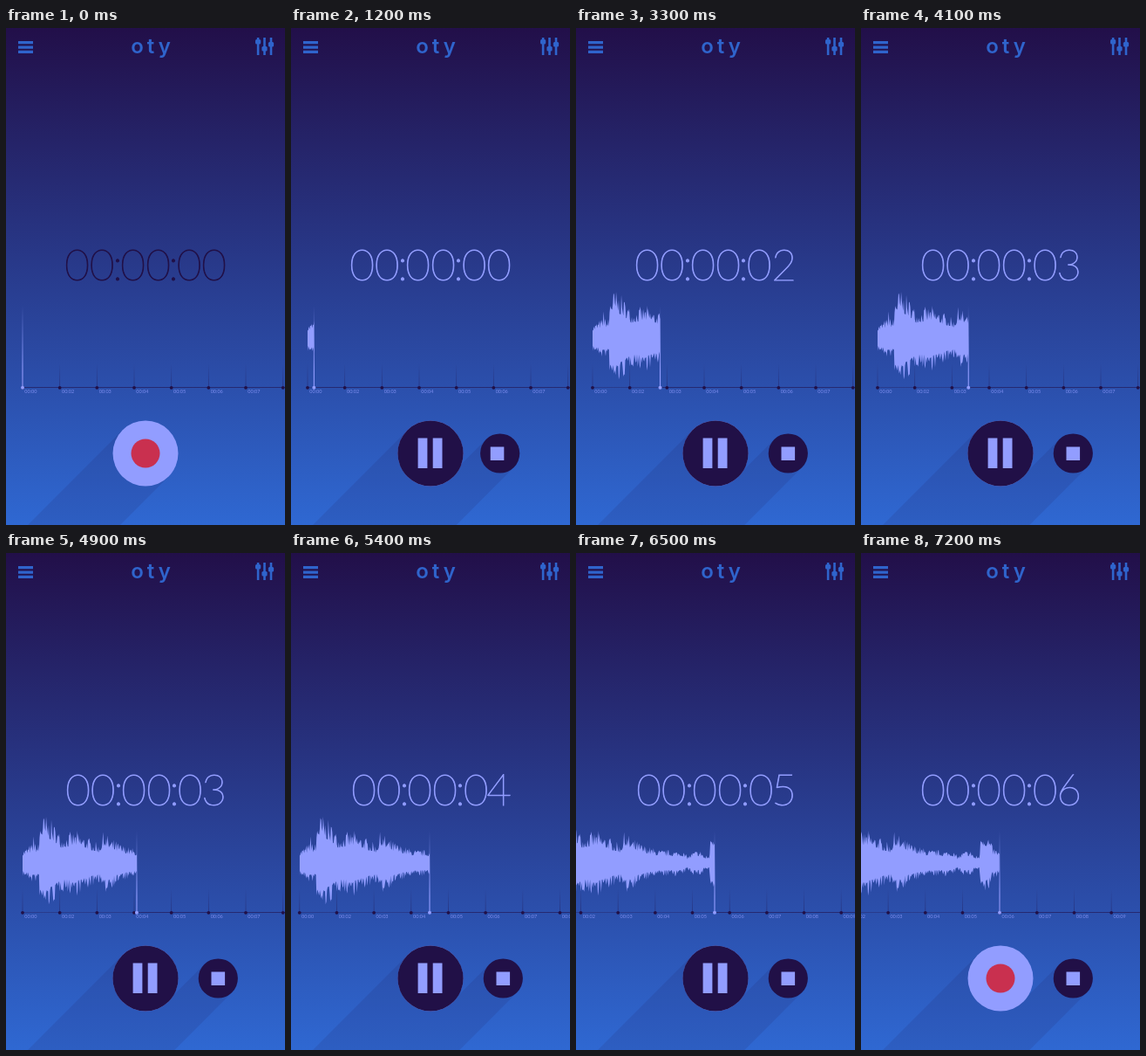
These frames come from a looping animation (320 by 569 pixels, 8 s). An HTML page:

```html
<!DOCTYPE html>
<html lang="en">
<head>
<meta charset="utf-8">
<title>Audio recorder</title>
<style>
  html, body { margin: 0; width: 100%; height: 100%; overflow: hidden; background: #220f49; }
  svg { display: block; width: 100%; height: 100%; }
  text { font-family: Lato, sans-serif; }
  .brand { font: 600 24px Inter, sans-serif; letter-spacing: 4px; }
  #timer { font-size: 49.5px; font-weight: 200; text-anchor: middle; fill: currentColor; stroke: currentColor; stroke-width: .95px; }
  #ticks text { font-size: 5.5px; fill: #929dff; opacity: .8; }
  .blue { fill: #2f64cc; }
  .dark { fill: #211047; }
  .lilac { fill: #929dff; }
</style>
</head>
<body>
<svg viewBox="0 0 320 569" preserveAspectRatio="none">
  <defs>
    <linearGradient id="sky" x2="0" y2="1">
      <stop stop-color="#220f49"/><stop offset="1" stop-color="#2f68d2"/>
    </linearGradient>
    <linearGradient id="tickFade" x2="0" y2="1">
      <stop stop-color="#211047" stop-opacity="0"/><stop offset="1" stop-color="#211047" stop-opacity=".5"/>
    </linearGradient>
    <linearGradient id="headFade" x2="0" y2="1">
      <stop stop-color="#929dff" stop-opacity="0"/><stop offset=".8" stop-color="#929dff"/>
    </linearGradient>
    <clipPath id="recorded"><rect id="reveal" x="19" y="290" width="0" height="130"/></clipPath>
  </defs>

  <rect width="320" height="569" fill="url(#sky)"/>

  <path class="blue" d="M14 15h17v3.3h-17zM14 20.4h17v3.3h-17zM14 25.8h17v3.3h-17z"/>
  <text class="brand blue" x="168" y="29" text-anchor="middle">oty</text>
  <path class="blue" d="M287.8 11h2.6v20h-2.6zM295.2 11h2.6v20h-2.6zM302.7 11h2.6v20h-2.6z"/>
  <g class="blue">
    <rect x="286" y="13" width="6.2" height="5.4" rx="1.5"/>
    <rect x="293.4" y="21" width="6.2" height="5.4" rx="1.5"/>
    <rect x="300.9" y="16" width="6.2" height="5.4" rx="1.5"/>
  </g>

  <text id="timer" y="288.5"></text>

  <g id="track">
    <rect class="dark" x="19" y="411" width="460" height="1" opacity=".3"/>
    <g id="ticks"></g>
    <g clip-path="url(#recorded)"><path id="wave" class="lilac"/></g>
  </g>
  <g id="head">
    <rect class="dark" y="411" width="310" height="1" opacity=".4"/>
    <rect x="-.55" y="318" width="1.1" height="94" fill="url(#headFade)"/>
    <circle class="lilac" cy="411.8" r="2"/>
  </g>

  <g class="dark" opacity=".11">
    <path d="M133.5 460.5L-66.5 660.5L-13.5 713.5L186.5 513.5z"/>
    <path id="stopShade" d="M-16 471L-216 671L-184 703L16 503z"/>
  </g>
  <circle id="stopDisc" class="dark" cy="487" r="22.6"/>
  <rect id="stopIcon" class="lilac" x="-7.8" y="479.5" width="15.6" height="15.5"/>
  <circle class="lilac" cx="160" cy="487" r="37.5"/>
  <circle cx="160" cy="487" r="16.5" fill="#c9304f"/>
  <g id="pause">
    <circle class="dark" cx="160" cy="487" r="37.6"/>
    <path class="lilac" d="M145.6 469.5h10.8v34.5h-10.8zM162.7 469.5h10.8v34.5h-10.8z"/>
  </g>
</svg>
<script>
const $ = id => document.getElementById(id);
const clamp = (v, lo = 0, hi = 1) => Math.min(hi, Math.max(lo, v));
const START = 19, END = 232, PITCH = 42.67, MID = 355;

// Time scale: the second label is 00:02
$('ticks').innerHTML = Array.from({ length: 10 }, (_, i) => {
  const x = START + i * PITCH, sec = i ? i + 1 : 0;
  return `<rect x="${x - .4}" y="384" width=".8" height="28" fill="url(#tickFade)"/>
    <circle class="dark" cx="${x}" cy="411.8" r="1.9"/>
    <text x="${x + 2.3}" y="418">00:${String(sec).padStart(2, '0')}</text>`;
}).join('');

// Loudness envelope as x, peak pairs
const envelope = [[19, 15], [30, 22], [38, 22], [39, 53], [46, 53], [53, 46], [60, 38],
  [63, 31], [80, 36], [95, 28], [107, 21], [112, 36], [118, 29], [132, 21], [150, 15],
  [178, 14], [184, 8], [192, 14], [201, 14], [203, 8], [209, 9], [211, 38], [220, 31],
  [224, 18], [END, 14]];

function peak(x) {
  const i = Math.max(1, envelope.findIndex(p => p[0] >= x));
  const [x0, a] = envelope[i - 1], [x1, b] = envelope[i];
  return a + (b - a) * (x - x0) / (x1 - x0);
}

let seed = 7;
const random = () => (seed = seed * 16807 % 2147483647) / 2147483647;

function drawWave() {
  const top = [], bottom = [];
  const size = x => peak(x) * (.56 + .5 * random() ** 2);
  for (let x = START; x <= END; x += .75) {
    const spike = Math.abs(x - 32) < .4 ? 18 : 0;
    top.push(`${x.toFixed(1)} ${(MID - size(x) - spike).toFixed(1)}`);
    bottom.unshift(`${x.toFixed(1)} ${(MID + size(x)).toFixed(1)}`);
  }
  $('wave').setAttribute('d', `M${top.concat(bottom).join('L')}z`);
}
drawWave();

const glyphX = [81.5, 110, 128, 145.5, 174.5, 192, 210];
const glyphShift = [0, 6, 0, 1, 2, 2, 1];
const mix = (a, b, k) => `rgb(${a.map((v, i) => v + (b[i] - v) * k)})`;
const move = (id, x) => $(id).setAttribute('transform', `translate(${x})`);
const slide = (t, tau) => 160 + 83.3 * (1 - Math.exp(-Math.max(0, t - .95) / tau));

function draw(now) {
  const t = now % 8000 / 1000;

  // The head runs to the middle, then the track scrolls beneath it
  const x = clamp(START + 33.4 * (t - .98), START, 159);
  const scroll = clamp((t - 5.185) * PITCH, 0, 73.2);
  move('head', x);
  move('track', -scroll);
  $('reveal').setAttribute('width', x + scroll - START);

  const sec = clamp(Math.floor(t - 1), 0, 6);
  const on = clamp((t - .85) / .25);
  $('timer').textContent = '00:00:0' + sec;
  $('timer').setAttribute('x', [...glyphX.map(v => v + glyphShift[sec]), 238.5].join(' '));
  $('timer').style.color = mix([33, 16, 71], [146, 157, 255], on);

  move('stopShade', slide(t, .08));
  move('stopDisc', slide(t, .08));
  move('stopIcon', slide(t, .1));
  $('pause').style.opacity = on * (1 - clamp((t - 6.95) / .25));
  requestAnimationFrame(draw);
}
requestAnimationFrame(draw);
</script>
</body>
</html>
```
